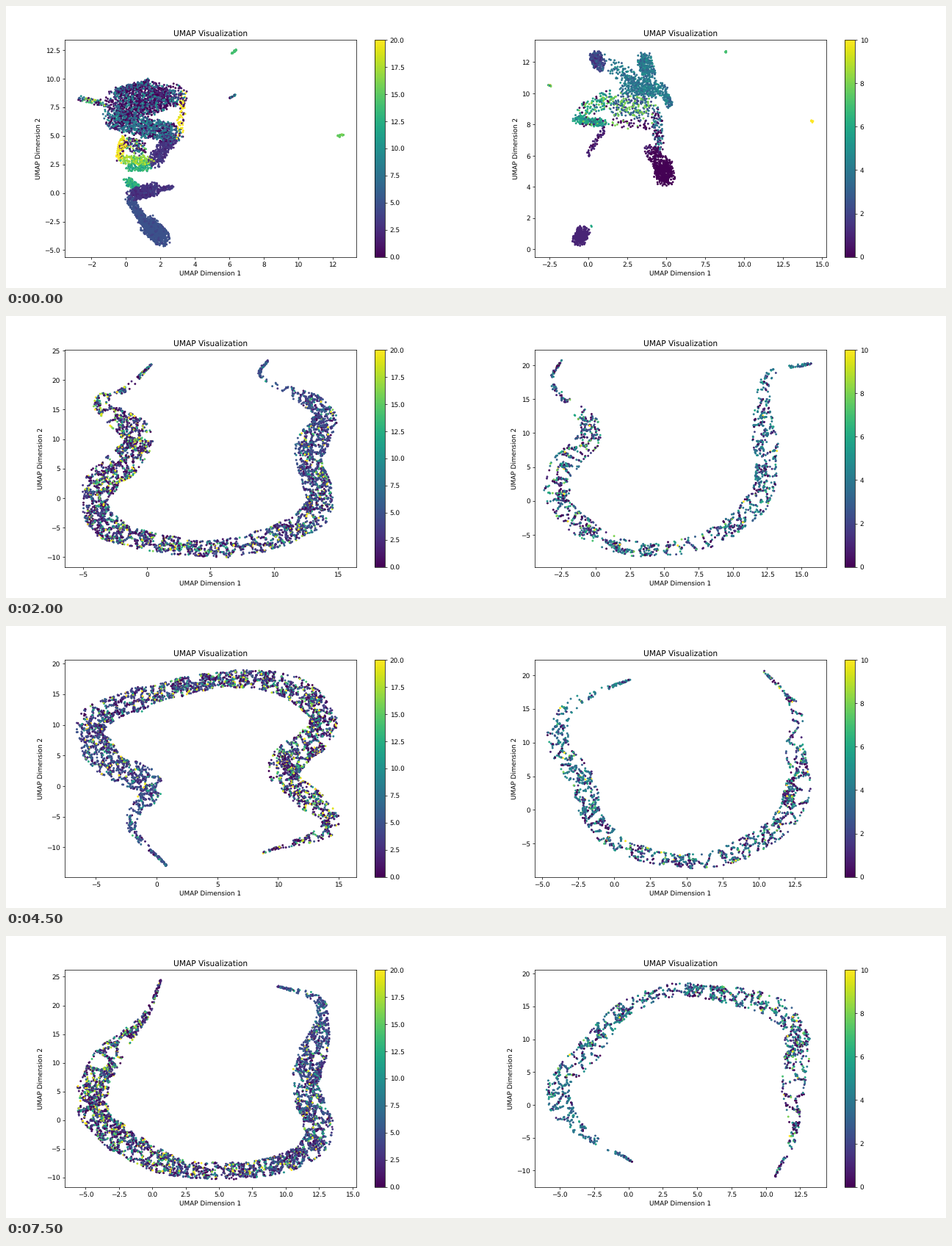
Animation of 1280 by 384 pixels, one loop 8000 ms. Source, as a matplotlib script:

```python
import matplotlib.pyplot as plt
import numpy as np
from matplotlib.animation import FuncAnimation

plt.rcParams["text.hinting"] = "none"
AX_W, AX_H, AX_TOP = 396.8, 295.68, 46.08  # axes box in pixels

fig = plt.figure(figsize=(20, 6), dpi=64)


def spline(points, steps=60):
    """Catmull-Rom curve resampled to even arc length."""
    p = np.reshape(np.array(points, float), (-1, 2))
    p = np.vstack([2 * p[0] - p[1], p, 2 * p[-1] - p[-2]])
    u = np.linspace(0, 1, steps, endpoint=False)[:, None]
    a, b, c, d = p[:-3, None], p[1:-2, None], p[2:-1, None], p[3:, None]
    curve = 0.5 * (2 * b + (c - a) * u + (2 * a - 5 * b + 4 * c - d) * u**2
                   + (3 * b - a - 3 * c + d) * u**3)
    curve = curve.reshape(-1, 2)
    s = np.r_[0, np.cumsum(np.hypot(*np.diff(curve, axis=0).T))]
    even = np.linspace(0, s[-1], 800)
    return np.interp(even, s, curve[:, 0]), np.interp(even, s, curve[:, 1]), s[-1]


def band_width(t, width, rng):
    """Half-width: thin tips, wide arms, narrow arch, uneven edges."""
    taper = np.clip(np.minimum(t, 1 - t) / 0.16, 0, 1) ** 1.2
    arms = 1 - 0.3 * np.cos(4 * np.pi * t)
    lobes = np.interp(t, np.linspace(0, 1, 60), rng.uniform(0.78, 1.15, 60))
    return 1 + width * taper * arms * lobes


class Panel:
    def __init__(self, x0, top, count, width, cell, wall, mix, tail):
        self.x0, self.top, self.count = x0, top, count
        self.width, self.cell, self.wall = width, cell, wall
        self.mix, self.tail = mix, tail
        self.blobs, self.bands = [], []
        self.ax = fig.add_axes([x0 / 1280, 0.11, AX_W / 1280, 0.77])
        self.dots = self.ax.scatter([0], [0], c=[0], s=5, vmin=0, vmax=top)
        cax = fig.add_axes([(x0 + 421.6) / 1280, 0.11, 14.8 / 1280, 0.77])
        fig.colorbar(self.dots, cax=cax)
        self.ax.set(title="UMAP Visualization", xlabel="UMAP Dimension 1",
                    ylabel="UMAP Dimension 2")

    def blob(self, n, classes, x0, y0, x1, y1, r):
        self.blobs.append((n, classes, x0, y0, x1, y1, r))

    def band(self, lims, points):
        self.bands.append((lims, points))

    def clusters(self, rng):
        """Round-ended strokes filled with random dots."""
        parts = []
        for n, classes, x0, y0, x1, y1, r in self.blobs:
            t, a = rng.random(n), rng.uniform(0, 2 * np.pi, n)
            d = r * np.sqrt(rng.random(n)) + rng.normal(0, 0.08 * r, n)
            parts.append((x0 + (x1 - x0) * t + d * np.cos(a),
                          y0 + (y1 - y0) * t + d * np.sin(a),
                          rng.choice(classes, n)))
        dots = np.hstack([np.array(p) for p in parts])
        return dots[:, rng.permutation(dots.shape[1])]

    def net(self, points, rng):
        """Band of dots gathered on the walls of random cells."""
        x, y, length = spline(points)
        t = np.linspace(0, 1, len(x))
        w = band_width(t, self.width, rng)
        nx, ny = -np.gradient(y), np.gradient(x)
        norm = np.hypot(nx, ny)
        n = 4 * self.count
        weight = np.maximum(w, 3)
        i = rng.choice(len(x), n, p=weight / weight.sum())
        v = rng.uniform(-1, 1, n)
        px = x[i] + nx[i] / norm[i] * w[i] * v
        py = y[i] + ny[i] / norm[i] * w[i] * v

        k = int(2 * w.mean() * length / self.cell)
        dist = np.hypot(px[:, None] - px[:k], py[:, None] - py[:k])
        near = np.partition(dist, 1, axis=1)[:, :2]
        keep = near[:, 1] - near[:, 0] < self.wall
        keep |= (np.abs(v) > 0.9) & (rng.random(n) < 0.4)
        keep |= w[i] < 2.5
        keep[:k] = False
        i, px, py = (c[keep][:self.count] for c in (i, px, py))
        in_tail = rng.random(len(i)) < 0.95 * t[i] ** 1.8
        val = np.where(in_tail, rng.choice(self.tail, len(i)),
                       rng.choice(self.mix, len(i)))
        return px, py, val

    def view(self, k, flip_x, flip_y, seed):
        rng = np.random.default_rng(seed)
        lims, points = self.bands[k]
        px, py, val = self.net(points, rng) if points else self.clusters(rng)
        x_lo, x_hi, y_lo, y_hi = lims
        x = x_lo + (px - self.x0) / AX_W * (x_hi - x_lo)
        y = y_hi - (py - AX_TOP) / AX_H * (y_hi - y_lo)
        if flip_x:
            x, x_lo, x_hi = 10 - x, 10 - x_hi, 10 - x_lo
        if flip_y:
            y, y_lo, y_hi = 10 - y, 10 - y_hi, 10 - y_lo
        return np.c_[x, y], val, (x_lo, x_hi), (y_lo, y_hi)

    def show(self, xy, val, xlim, ylim):
        self.dots.set_offsets(xy)
        self.dots.set_array(val)
        self.ax.set_xlim(xlim)
        self.ax.set_ylim(ylim)


# Class labels, repeated by how common they are
MIX_20 = [0] * 8 + [1] * 6 + [2, 3] * 3 + [3, 5] * 2 + [4, 5, 20] * 2 + [*range(6, 20)]
TAIL_20 = [5] * 10 + [3, 4] * 4 + [2, 6, 7, 9, 12]
MIX_10 = [0] * 9 + [1] * 7 + [2, 3, 5] * 4 + [4] * 6 + [6] * 3 + [8, 8, 7, 10]
TAIL_10 = [4] * 10 + [3, 5] * 3 + [0, 1, 2, 6]

left = Panel(80, 20, 4800, 14.5, 80, 2.5, MIX_20, TAIL_20)
right = Panel(720, 10, 1750, 11.5, 125, 1.7, MIX_10, TAIL_10)

# Opening clusters
DARK, TEAL = [0, 0, 0, 1, 1, 2, 3, 7, 8, 10], [0, 1, 3, 6, 7, 8, 9, 10]
GOLD, LIME, GREEN = [20, 20, 19, 1], [14, 16, 17, 18], [11, 12, 13, 14]
PLUM, BLUE = [2, 3, 3, 3, 4], [4, 5, 5, 5, 5]

left.band((-3.557, 13.37, -5.6, 13.4), None)
left.blob(1000, DARK, 152, 136, 200, 124, 23)
left.blob(330, DARK, 205, 125, 230, 122, 17)
left.blob(200, TEAL, 150, 116, 194, 104, 5)
left.blob(950, TEAL, 144, 154, 228, 174, 14)
left.blob(350, PLUM, 224, 180, 202, 212, 10)
left.blob(80, GOLD, 242, 118, 235, 178, 5)
left.blob(110, GOLD, 160, 180, 154, 210, 5)
left.blob(110, DARK + LIME, 168, 186, 188, 198, 10)
left.blob(190, LIME, 158, 209, 197, 211, 6)
left.blob(100, GREEN, 166, 220, 194, 220, 5)
left.blob(75, LIME + TEAL, 99, 126, 134, 133, 4)
left.blob(110, GREEN, 164, 238, 178, 246, 6)
left.blob(550, PLUM, 172, 257, 204, 249, 9)
left.blob(60, PLUM, 210, 250, 226, 246, 3)
left.blob(260, BLUE, 169, 264, 188, 293, 6)
left.blob(800, BLUE, 192, 296, 213, 316, 12)
left.blob(26, [14], 306, 66, 314, 59, 1)
left.blob(16, TEAL, 305, 125, 312, 121, 1)
left.blob(20, [15, 16], 452, 177, 459, 175, 2)

SEA, LEAF, NIGHT = [4, 4, 4, 4, 5, 3], [5, 6, 6, 6, 4], [0, 0, 0, 1]
right.band((-3.44, 15.27, -0.485, 13.43), None)
right.blob(260, [2, 2, 2, 1, 3], 802, 67, 808, 81, 9)
right.blob(260, SEA, 868, 70, 875, 95, 10)
right.blob(380, SEA, 846, 108, 892, 114, 12)
right.blob(90, SEA, 898, 118, 904, 136, 5)
right.blob(90, SEA, 818, 78, 855, 100, 12)
right.blob(240, [3, 3, 8, 4, 8, 2], 830, 132, 875, 140, 17)
right.blob(180, LEAF, 776, 154, 815, 160, 6)
right.blob(120, LEAF + [8, 8, 0], 784, 144, 825, 122, 11)
right.blob(80, NIGHT + [8], 785, 158, 878, 162, 7)
right.blob(60, [1, 1, 0], 814, 168, 793, 202, 4)
right.blob(110, SEA + NIGHT, 886, 142, 889, 195, 7)
right.blob(110, NIGHT, 878, 196, 886, 210, 11)
right.blob(420, [0], 893, 216, 899, 234, 13)
right.blob(320, [1], 786, 307, 780, 319, 9)
right.blob(2, LEAF, 797, 300, 798, 300, 1)
right.blob(12, [8, 8, 10, 5], 738, 107, 742, 109, 1)
right.blob(6, [7], 979, 63, 981, 62, 1)
right.blob(8, [10], 1096, 155, 1099, 158, 1)

# Bands: axis limits, then key points of the centre line
left.band((-6.5, 17.27, -11.5, 25.9), [
    174, 60, 138, 88, 160, 140, 166, 200, 130, 258, 165, 301, 250, 317,
    330, 307, 425, 264, 438, 228, 370, 170, 396, 125, 312, 65])
left.band((-6.44, 16.43, -11.65, 25.12), [
    198, 66, 165, 98, 128, 120, 182, 170, 125, 235, 140, 288, 245, 315,
    340, 309, 425, 264, 412, 190, 432, 130, 350, 84, 357, 59])
left.band((-5.99, 18.62, -11.38, 23.28), [
    205, 67, 105, 78, 145, 150, 157, 190, 126, 250, 165, 302, 240, 318,
    315, 302, 400, 255, 408, 200, 350, 156, 364, 88, 459, 64])
left.band((-7.57, 16.44, -14.83, 20.6), [
    350, 309, 443, 270, 378, 198, 432, 138, 395, 87, 310, 72, 205, 92,
    118, 130, 140, 187, 200, 218, 170, 270, 219, 327])
left.band((-6.87, 15.58, -14.73, 21.34), [
    333, 327, 412, 298, 438, 222, 428, 160, 432, 108, 365, 79, 275, 75,
    180, 88, 124, 140, 145, 206, 195, 255, 185, 306, 131, 327])
left.band((-6.57, 15.29, -11.64, 26.2), [
    211, 60, 190, 108, 135, 172, 118, 235, 165, 283, 245, 317, 360, 314,
    425, 275, 408, 200, 428, 130, 425, 87, 369, 68])

right.band((-6.82, 16.12, -12.18, 19.62), [
    739, 328, 790, 263, 806, 220, 778, 140, 815, 93, 920, 72, 1000, 93,
    1010, 150, 1040, 190, 1090, 245, 1065, 288, 991, 309])
right.band((-4.43, 16.8, -9.74, 22.27), [
    756, 60, 745, 95, 797, 155, 754, 213, 760, 265, 825, 309, 890, 318,
    965, 300, 1025, 250, 1035, 195, 1030, 130, 1040, 80, 1099, 64])
right.band((-5.18, 15.17, -12.83, 19.6), [
    812, 317, 752, 293, 768, 225, 757, 155, 800, 88, 890, 68, 990, 77,
    1045, 125, 1050, 185, 1058, 230, 1093, 285, 1090, 328])
right.band((-5.51, 14.68, -9.98, 22.29), [
    1031, 60, 1074, 110, 1074, 165, 1080, 215, 1050, 275, 955, 319, 850, 305,
    800, 262, 785, 210, 752, 160, 770, 108, 851, 72])
right.band((-4.6, 15.73, -9.63, 23.16), [
    751, 60, 785, 120, 783, 185, 756, 235, 775, 287, 855, 316, 940, 314,
    1020, 268, 1050, 215, 1084, 160, 1045, 108, 965, 77])
right.band((-6.82, 14.39, -12.49, 20.56), [
    1047, 328, 1071, 275, 1072, 205, 1077, 140, 1045, 97, 960, 77, 900, 75,
    835, 105, 795, 155, 752, 205, 775, 258, 854, 308])

# Each step: layout, mirrored in x, mirrored in y
STEPS = [(0, 0, 0), (5, 1, 0), (1, 0, 0), (4, 1, 0), (2, 0, 0), (6, 1, 0),
         (3, 0, 0), (1, 0, 1), (5, 1, 0), (4, 0, 0), (3, 1, 0), (2, 0, 1),
         (6, 1, 1), (5, 0, 0), (1, 1, 0), (6, 0, 0)]
views = [[p.view(*step, seed) for p in (left, right)]
         for seed, step in enumerate(STEPS)]


def draw(i):
    for panel, view in zip((left, right), views[i]):
        panel.show(*view)
    return left.dots, right.dots


anim = FuncAnimation(fig, draw, frames=len(STEPS), interval=500, repeat=True)
plt.show()
```
